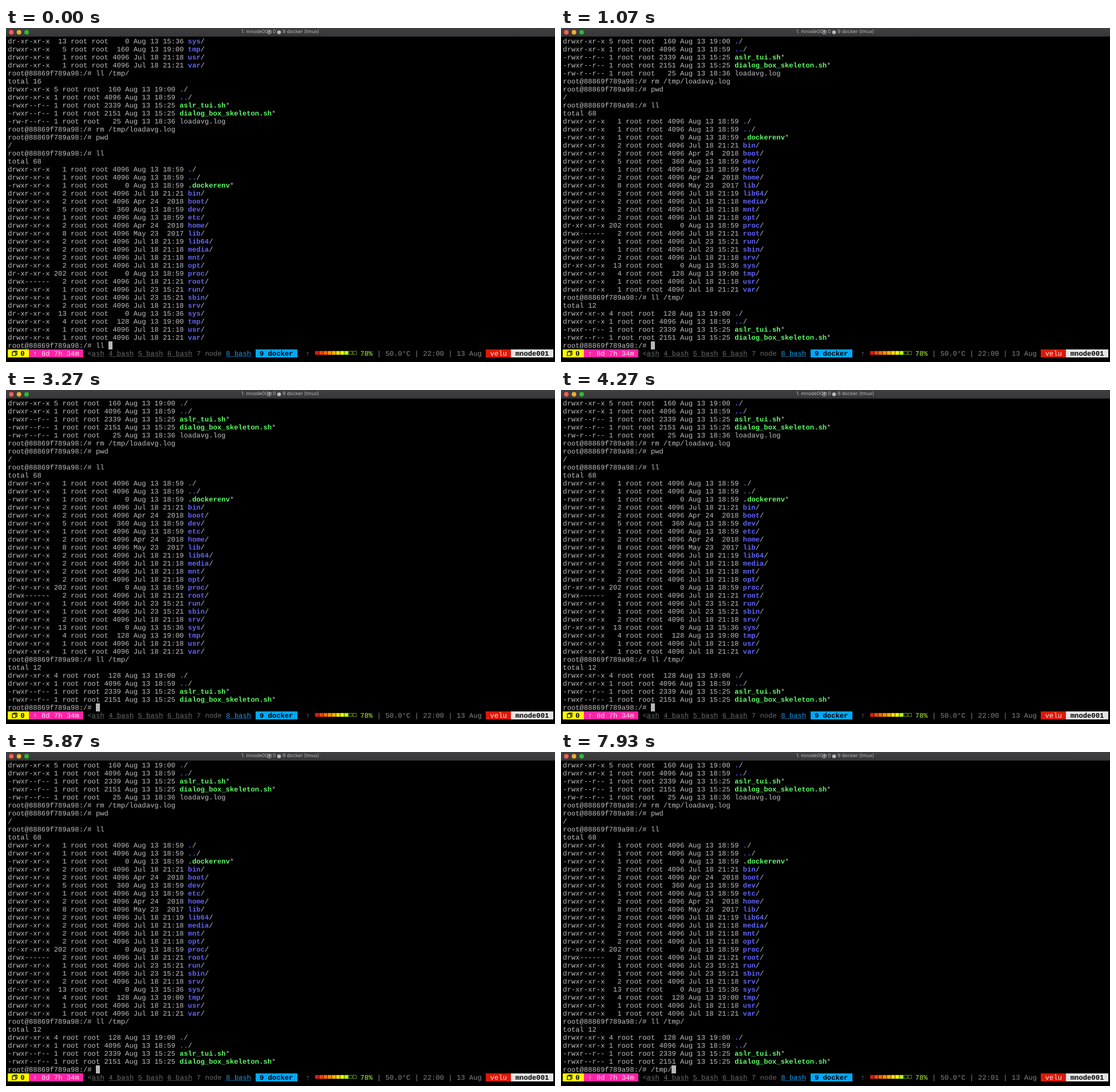
These frames come from a looping animation (959 by 584 pixels, 8000 ms). An HTML page:

```html
<!DOCTYPE html>
<html lang="en">
<head>
<meta charset="utf-8">
<title>Terminal</title>
<style>
  html, body { margin: 0; width: 100%; height: 100%; overflow: hidden; background: #000; }
  #stage {
    --cell: 7.326px; --left: 3.33px;
    position: relative; width: 959px; height: 584px; overflow: hidden; background: #000;
    color: #bfbfbf; font: 12.208px/16px "Liberation Mono", monospace;
    text-rendering: geometricPrecision; white-space: pre;
  }
  #stage > *, #status > *, #title > * { position: absolute; top: 0; }
  #stage > #title {
    left: 0; width: 959px; height: 15px; color: #b9b8b9;
    background: linear-gradient(#403f41, #373638);
    font: 8.5px/15px Inter, sans-serif;
  }
  svg { left: 0; }
  #stage > #screen { left: var(--left); top: 16px; height: 546px; width: 952px; overflow: hidden; }
  #screen div { height: 14px; }
  b { font-weight: 700; }
  .dir { color: #6064f6; }
  .exec { color: #5ffa68; }
  #cursor { display: inline-block; vertical-align: top; width: var(--cell); height: 14px; background: #b8b8b8; }
  #stage > #status { left: 0; top: 562px; width: 959px; height: 14px; color: #858585; }
  #status > span { left: calc(var(--left) + var(--col) * var(--cell)); height: 14px; }
  .tab { color: #6c6c6c; }
  u {
    text-decoration-thickness: 1px; text-underline-offset: 1px;
    text-decoration-color: color-mix(in srgb, currentColor 65%, black);
  }
</style>
</head>
<body>
<div id="stage">
  <div id="title">
    <span style="left:411px">1. mnode001</span>
    <span style="left:466px">0</span>
    <span style="left:483px">9 docker (tmux)</span>
    <svg width="959" height="15">
      <circle cx="9.3" cy="7.4" r="4" fill="#fc5d57"/>
      <circle cx="22.7" cy="7.4" r="4" fill="#e8b02b"/>
      <circle cx="36" cy="7.4" r="4" fill="#2bb83c"/>
      <path d="M459.5 9.5V4.5H463.5V9.5M457.5 5.5H461.5V10.5H457.5Z" fill="none" stroke="#b9b8b9" stroke-width=".8"/>
      <circle cx="477" cy="7.5" r="3.3" fill="#b9b8b9"/>
    </svg>
  </div>
  <div id="screen"></div>
  <div id="status"></div>
</div>
<script>
const screen = document.getElementById('screen');
const status = document.getElementById('status');
const LOOP = 8000, ROWS = 39, CELL = 7.326;
const PROMPT = 'root@88869f789a98:/# ';

const history = `dr-xr-xr-x  13 root root    0 Aug 13 15:36 sys/
drwxr-xr-x   5 root root  160 Aug 13 19:00 tmp/
drwxr-xr-x   1 root root 4096 Jul 18 21:18 usr/
drwxr-xr-x   1 root root 4096 Jul 18 21:21 var/
${PROMPT}ll /tmp/
total 16
drwxr-xr-x 5 root root  160 Aug 13 19:00 ./
drwxr-xr-x 1 root root 4096 Aug 13 18:59 ../
-rwxr--r-- 1 root root 2339 Aug 13 15:25 aslr_tui.sh*
-rwxr--r-- 1 root root 2151 Aug 13 15:25 dialog_box_skeleton.sh*
-rw-r--r-- 1 root root   25 Aug 13 18:36 loadavg.log
${PROMPT}rm /tmp/loadavg.log
${PROMPT}pwd
/
${PROMPT}ll
total 68
drwxr-xr-x   1 root root 4096 Aug 13 18:59 ./
drwxr-xr-x   1 root root 4096 Aug 13 18:59 ../
-rwxr-xr-x   1 root root    0 Aug 13 18:59 .dockerenv*
drwxr-xr-x   2 root root 4096 Jul 18 21:21 bin/
drwxr-xr-x   2 root root 4096 Apr 24  2018 boot/
drwxr-xr-x   5 root root  360 Aug 13 18:59 dev/
drwxr-xr-x   1 root root 4096 Aug 13 18:59 etc/
drwxr-xr-x   2 root root 4096 Apr 24  2018 home/
drwxr-xr-x   8 root root 4096 May 23  2017 lib/
drwxr-xr-x   2 root root 4096 Jul 18 21:19 lib64/
drwxr-xr-x   2 root root 4096 Jul 18 21:18 media/
drwxr-xr-x   2 root root 4096 Jul 18 21:18 mnt/
drwxr-xr-x   2 root root 4096 Jul 18 21:18 opt/
dr-xr-xr-x 202 root root    0 Aug 13 18:59 proc/
drwx------   2 root root 4096 Jul 18 21:21 root/
drwxr-xr-x   1 root root 4096 Jul 23 15:21 run/
drwxr-xr-x   1 root root 4096 Jul 23 15:21 sbin/
drwxr-xr-x   2 root root 4096 Jul 18 21:18 srv/
dr-xr-xr-x  13 root root    0 Aug 13 15:36 sys/
drwxr-xr-x   4 root root  128 Aug 13 19:00 tmp/
drwxr-xr-x   1 root root 4096 Jul 18 21:18 usr/
drwxr-xr-x   1 root root 4096 Jul 18 21:21 var/`.split('\n');

const listing = `${PROMPT}ll /tmp/
total 12
drwxr-xr-x 4 root root  128 Aug 13 19:00 ./
drwxr-xr-x 1 root root 4096 Aug 13 18:59 ../
-rwxr--r-- 1 root root 2339 Aug 13 15:25 aslr_tui.sh*
-rwxr--r-- 1 root root 2151 Aug 13 15:25 dialog_box_skeleton.sh*`.split('\n');

// Each step: start time, typed command, whether the listing has been printed
const steps = [
  [0, 'll ', false],
  [270, 'll /', false],
  [470, 'll /t', false],
  [670, 'll /tmp/', false],
  [1000, '', true],
  [7330, '/', true],
  [7530, '/t', true],
  [7730, '/tmp/', true],
];
const CLOCK_TICK = 7870;

const colour = line => line
  .replace(/^(d.* )(\S+)\/$/, '$1<b class="dir">$2</b>/')
  .replace(/^(-.* )(\S+)\*$/, '$1<b class="exec">$2</b>*');

function drawScreen([, typed, listed]) {
  const lines = listed ? [...history, ...listing] : history;
  screen.innerHTML = lines.slice(1 - ROWS).map(colour)
    .concat(`${PROMPT}${typed}<i id="cursor"></i>`)
    .map(line => `<div>${line}</div>`).join('');
}

function segment(col, html, style = '', cls = '') {
  const span = document.createElement('span');
  span.className = cls;
  span.style.cssText = `--col:${col};${style}`;
  span.innerHTML = html;
  status.append(span);
  return span;
}

function bar(col, text, background, color, bold) {
  const style = `width:${text.length * CELL}px;background:${background};color:${color};`;
  segment(col, text, style + (bold ? 'font-weight:700' : ''));
}

bar(0, '   0 ', '#ffff00', '#000', true);
bar(5, ' ↑ 8d 7h 34m ', '#ff23a3', '#f0e4ec');
segment(19, '&lt;<u>ash</u>', '', 'tab');
[4, 5, 6].forEach((n, i) => segment(24 + 7 * i, `<u>${n} bash</u>`, '', 'tab'));
segment(45, '7 node', '', 'tab');
segment(52, '<u>8 bash</u>', 'color:#1c9ae6');
bar(59, ' 9 docker ', '#00a8ff', '#000', true);
segment(71, '↑');
segment(84, '78%', 'color:#b4ff2e');
segment(88, '| 50.0°C |');
const clock = segment(99, '22:00');
segment(105, '| 13 Aug');
bar(114, ' velu ', '#d81a08', '#f0e4e4');
bar(120, ' mnode001 ', '#e4e4e4', '#000', true);

const charge = ['#e01b0c', '#f4450c', '#ff6a00', '#ff8c00', '#ffb000', '#ffe000', '#f4ff00', '#b4ff10'];
const cells = Array.from({ length: 10 }, (_, i) => {
  const x = 540 + i * CELL;
  return i < charge.length
    ? `<rect x="${x}" y="2.8" width="6.6" height="6.6" fill="${charge[i]}"/>`
    : `<rect x="${x + .4}" y="3.2" width="5.8" height="5.8" fill="none" stroke="#7fb51c" stroke-width=".8"/>`;
}).join('');
status.insertAdjacentHTML('beforeend', `<svg width="959" height="14">${cells}
  <path d="M13.5 4V2.8H19.2V9.2H18M11 4.4H17V11H11Z" fill="none" stroke="#000" stroke-width="1.2"/></svg>`);

let shown;
const start = performance.now();
function frame() {
  const t = (performance.now() - start) % LOOP;
  const step = steps.findLast(s => s[0] <= t);
  if (step !== shown) drawScreen(shown = step);
  clock.textContent = t < CLOCK_TICK ? '22:00' : '22:01';
  requestAnimationFrame(frame);
}
frame();
</script>
</body>
</html>
```
